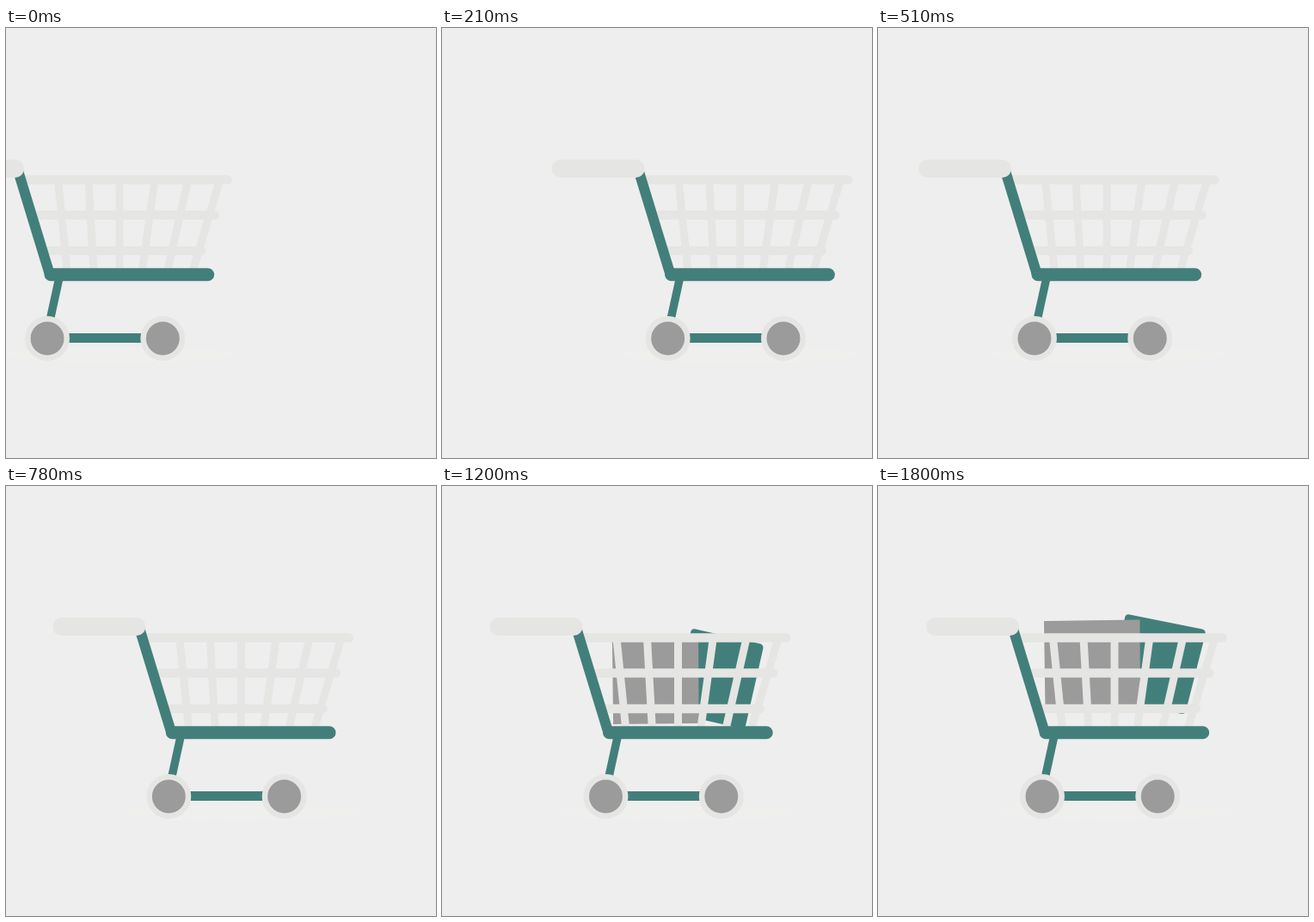
Animation of 500x500 px, one loop 2700 ms. Source, as an HTML page:

```html
<!DOCTYPE html>
<html lang="en">
<head>
<meta charset="utf-8">
<title>Shopping cart</title>
<style>
  html, body { margin: 0; width: 100%; height: 100%; overflow: hidden; background: #eee; }
  svg { display: block; width: 100%; height: 100%; }
  .light { stroke: #e5e5e3; }
  .teal { stroke: #427f7b; }
</style>
</head>
<body>
<svg viewBox="0 0 500 500" fill="none" stroke-linecap="round">
  <g id="cart">
    <ellipse cx="275" cy="380" rx="140" ry="9" fill="#efefee"/>
    <g id="goods">
      <path id="book" class="teal" fill="#427f7b" stroke-width="9" stroke-linejoin="round"
        d="M291.5 153.8 376.3 171 353.7 260.5 270 243.5Z"/>
      <path id="box" fill="#9b9b9b" d="M193 157 304.5 155.5 305 259 194.5 260Z"/>
    </g>
    <g class="light">
      <path stroke-width="10.5" d="M166 176.5H400.5M181 217.5H385.5M193 259H370"/>
      <path stroke-width="9" d="M203.5 177 214.5 285M239 177 245 285M275 177V285M315.8 177 301 285M354.5 177 330 285M391.5 177 359.5 285"/>
    </g>
    <g class="teal">
      <path stroke-width="9.5" d="M205 290 193 345"/>
      <path stroke-width="11" d="M191 360.5H325"/>
      <path stroke-width="12" d="M157 166 194 287"/>
      <path stroke-width="15" d="M195 286.8H377.7"/>
    </g>
    <path class="light" stroke-width="21" d="M66.5 163.5H153.5"/>
    <g class="light" fill="#9b9b9b" stroke-width="6.5">
      <circle cx="191" cy="361" r="22.7"/>
      <circle cx="325.3" cy="361" r="22.7"/>
    </g>
  </g>
</svg>
<script>
const LOOP = 2700, STEP = 30, END = 1800;
const ARRIVE = 145, DROP = 1080;
// [time, vertical offset] of the goods
const hops = [[DROP, -59], [1240, 30], [1510, -30.5], [1790, 0]];
const $ = id => document.getElementById(id);
const move = (id, value) => $(id).setAttribute('transform', value);

// The cart rolls in, then swings around its resting place.
function cartX(t) {
  if (t >= END) return 0;
  if (t < ARRIVE) return -143 * (1 - (t / ARRIVE) ** 1.3);
  const s = t - ARRIVE;
  return 171 * Math.exp(-0.005 * s) * Math.sin(Math.PI * s / 330);
}

function goodsY(t) {
  for (let i = 1; i < hops.length; i++) {
    const [t0, y0] = hops[i - 1], [t1, y1] = hops[i];
    if (t < t1) return y0 + (y1 - y0) * (1 - Math.cos(Math.PI * (t - t0) / (t1 - t0))) / 2;
  }
  return 0;
}

const squeeze = (cx, k) => `translate(${cx * (1 - k)} 0) scale(${k} 1)`;

function draw(now) {
  const t = Math.min(Math.floor(now % LOOP / STEP) * STEP, END);
  move('cart', `translate(${cartX(t)} 0)`);
  $('goods').style.display = t < DROP ? 'none' : '';
  if (t >= DROP) {
    const k = Math.min(1, 0.8 + 0.2 * (t - DROP) / 240);
    move('goods', `translate(0 ${goodsY(t)})`);
    move('box', squeeze(246, k));
    move('book', squeeze(313, k));
  }
}

const start = performance.now();
function tick() {
  draw(performance.now() - start);
  requestAnimationFrame(tick);
}
tick();
</script>
</body>
</html>
```
